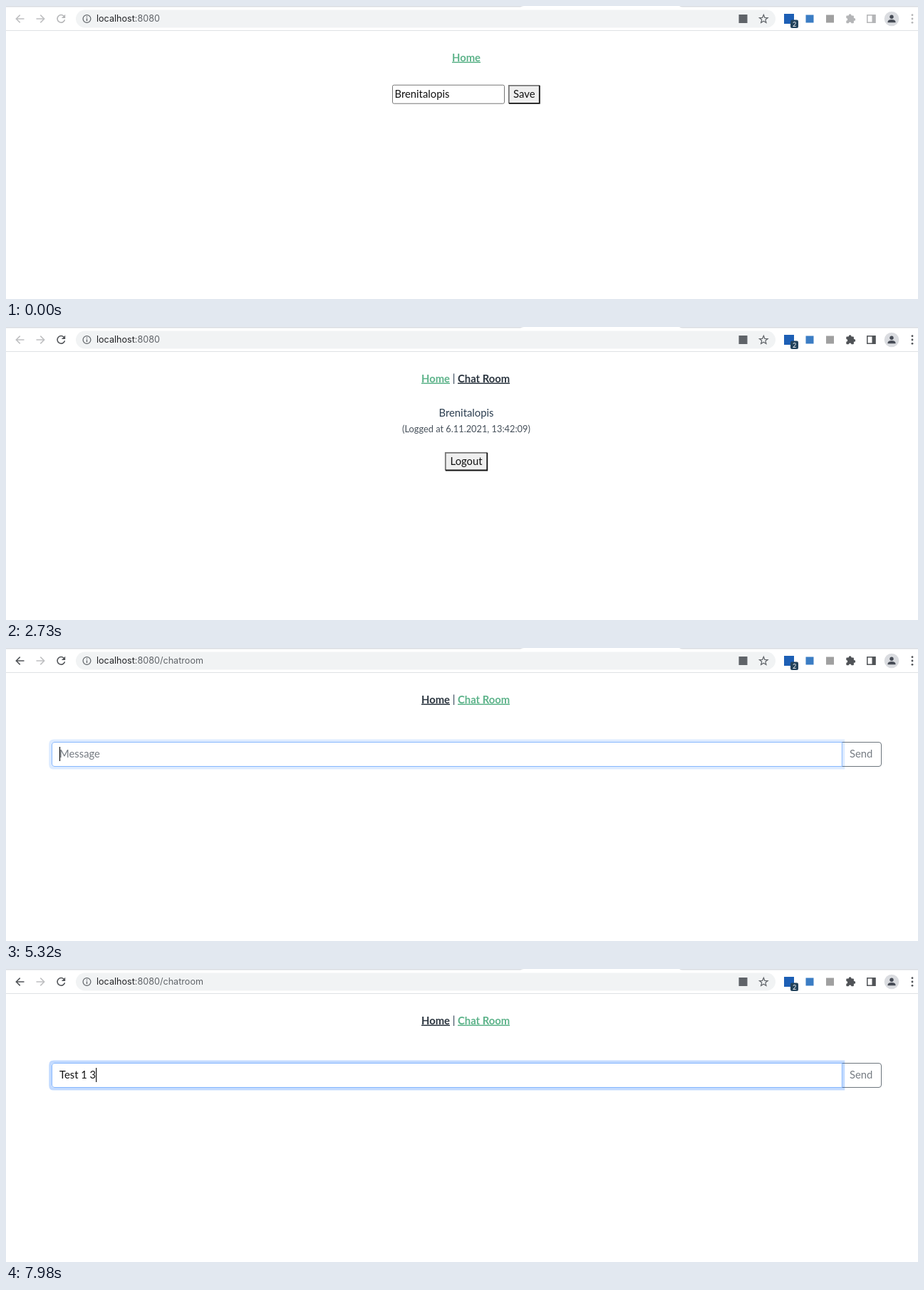
Animation of 1280x412 px, one loop 8 s. Source, as an HTML page:

```html
<!DOCTYPE html>
<html lang="en">
<head>
<meta charset="utf-8">
<title>Chat login</title>
<style>
  html, body { margin: 0; width: 100%; height: 100%; overflow: hidden; background: #fff; }
  svg { display: block; width: 1280px; height: 412px; }
  text { font: 14.8px Lato, "Open Sans", sans-serif; fill: #2c3e50; white-space: pre; }
  .url { font: 12.6px Inter, Roboto, sans-serif; fill: #5f6368; }
  .host { fill: #202124; }
  .link { font-weight: 700; text-decoration: underline; }
  .mid { text-anchor: middle; }
  .black { fill: #111; }
  .small { font-size: 12.8px; fill: #46505a; }
  .hint { fill: #757b82; }
  .line { fill: none; stroke: currentColor; stroke-width: 1.5; }
</style>
</head>
<body>
<svg viewBox="0 0 1280 412">
  <rect width="1280" height="412" fill="#fff"/>

  <!-- Browser toolbar -->
  <path d="M0 0H727Q724 0 722 1.5H0ZM945 0H1280V1.5H950Q947 1.5 945 0Z" fill="#dadde2"/>
  <path d="M0 34.5H1280" stroke="#dfe1e4"/>
  <rect x="98" y="5.5" width="982" height="25" rx="12.5" fill="#f1f3f4"/>
  <path id="back" class="line" d="M25.5 18H14.5M19.7 12.6 14.3 18 19.7 23.4"/>
  <path class="line" color="#bebfc1" d="M42.5 18H53.5M48.3 12.6 53.7 18 48.3 23.4"/>
  <g id="reload">
    <path class="line" d="M81.2 14.2A5.3 5.3 0 1 0 82.5 19.3"/>
    <path d="M83.2 11.7V17H77.9Z" fill="currentColor"/>
  </g>
  <g color="#5f6368">
    <circle class="line" cx="113.5" cy="18" r="5.4" style="stroke-width:1.2"/>
    <path class="line" d="M113.5 17.2V21M113.5 14.8V16.1" style="stroke-width:1.3"/>
    <rect x="1028.5" y="12" width="12" height="12" fill="currentColor"/>
    <path id="star" class="line" style="stroke-width:1.2"/>
  </g>
  <text class="url" x="127" y="22.4"><tspan class="host">localhost</tspan>:8080<tspan id="route"></tspan></text>
  <rect x="1092" y="11" width="14" height="14" fill="#1d5fb5"/>
  <rect x="1101" y="19.5" width="11" height="11.5" rx="2" fill="#23435c"/>
  <text class="mid" x="1106.5" y="28.7" style="font-size:9px;fill:#fff">2</text>
  <rect x="1122.5" y="12.5" width="11" height="11" fill="#3b7dc4"/>
  <rect x="1151" y="12.5" width="11" height="11" fill="#a0a0a0"/>
  <g id="tools">
    <g fill="currentColor">
      <rect x="1179.3" y="13.6" width="10.6" height="10.6" rx="1"/>
      <circle cx="1184.6" cy="13.2" r="1.9"/>
      <circle cx="1190.3" cy="18.9" r="1.9"/>
      <circle cx="1179.4" cy="18.9" r="1.8" fill="#fff"/>
      <circle cx="1184.6" cy="24.2" r="1.8" fill="#fff"/>
      <circle cx="1272" cy="12.7" r="1.4"/>
      <circle cx="1272" cy="18" r="1.4"/>
      <circle cx="1272" cy="23.3" r="1.4"/>
      <rect x="1215.5" y="12" width="5" height="12"/>
    </g>
    <rect class="line" x="1208.8" y="12.8" width="11" height="10.4"/>
  </g>
  <circle cx="1243" cy="18" r="10.3" fill="#dadce0"/>
  <g fill="#474c56">
    <circle cx="1243" cy="15.2" r="2.7"/>
    <path d="M1237.5 23.3V22Q1238 19 1243 19T1248.5 22V23.3Z"/>
  </g>

  <!-- Login -->
  <g id="login">
    <text class="link mid" x="646" y="77.5" style="fill:#5db38a">Home</text>
    <rect id="nameBox" fill="#fff"/>
    <text id="nameText" class="black" x="545.5" y="129"></text>
    <g id="save"></g>
  </g>

  <!-- Navigation once logged in -->
  <g id="nav">
    <text id="homeLink" class="link" x="583" y="77.5">Home</text>
    <text class="mid" x="628.5" y="77">|</text>
    <text id="chatLink" class="link" x="634" y="77.5">Chat Room</text>
  </g>

  <g id="profile">
    <text id="profileName" class="mid" x="646" y="126"></text>
    <text class="mid small" x="646" y="147.7">(Logged at 6.11.2021, 13:42:09)</text>
    <g id="logout"></g>
  </g>

  <g id="chat">
    <path d="M1172.5 132.5H1225Q1228.5 132.5 1228.5 136V163Q1228.5 166.5 1225 166.5H1172.5Z" fill="#fff" stroke="#6c757d"/>
    <text class="mid hint" x="1200.2" y="154">Send</text>
    <path id="ring" fill="none" stroke="#0d6efd" stroke-width="3.8"
      d="M1175.3 130.3H67Q62.2 130.3 62.2 135V164Q62.2 168.7 67 168.7H1175.3Z"/>
    <path id="messageBox" fill="#fff"/>
    <text id="messageText" x="75" y="154"></text>
  </g>
  <path id="caret" stroke="#111" stroke-width="1.2"/>
</svg>

<script>
const LOOP = 8000;
const USER = "Brenitalopis";
const MESSAGE = "Test 1 3";
const KEY_TIMES = [6510, 6720, 7000, 7210, 7420, 7560, 7770, 7980];
const GREEN = "#5db38a", INK = "#2c3640", DIM = "#b4b5b7", DARK = "#505357";

const $ = id => document.getElementById(id);
const show = (id, on) => $(id).setAttribute("display", on ? "inline" : "none");
const set = (id, attrs) => {
  for (const [key, value] of Object.entries(attrs)) $(id).setAttribute(key, value);
};
const within = (t, from, to) => t >= from && t < to;

function button(id, label, x, y, w, h) {
  const corner = (d, name) => `<path class="${name}" d="${d}" fill="none" stroke-width="1.8"/>`;
  $(id).innerHTML =
    `<rect x="${x}" y="${y}" width="${w}" height="${h}" fill="#efefef"/>` +
    corner(`M${x} ${y + h}V${y}H${x + w}`, "upper") +
    corner(`M${x} ${y + h}H${x + w}V${y}`, "lower") +
    `<text class="mid black" x="${x + w / 2}" y="${y + 17.2}">${label}</text>`;
  press(id, false);
}

function press(id, down) {
  const [upper, lower] = down ? ["#111", "#767676"] : ["#767676", "#111"];
  $(id).querySelector(".upper").style.stroke = upper;
  $(id).querySelector(".lower").style.stroke = lower;
}

function starPath(cx, cy, outer, inner) {
  const points = Array.from({ length: 10 }, (_, i) => {
    const r = i % 2 ? inner : outer, a = i * Math.PI / 5 - Math.PI / 2;
    return `${cx + r * Math.cos(a)} ${cy + r * Math.sin(a)}`;
  });
  return `M${points.join("L")}Z`;
}

function drawCaret(x, top, bottom) {
  set("caret", { d: `M${x} ${top}V${bottom}` });
}

function drawLogin(t) {
  const focused = within(t, 1820, 2520);
  const edge = focused ? 2 : 1;
  set("nameBox", {
    x: 542 + edge / 2, y: 110.7 + edge / 2, width: 158 - edge, height: 27 - edge,
    rx: 2, stroke: focused ? "#1c5c9c" : "#767676", "stroke-width": edge
  });
  press("save", t >= 2520);
  if (focused) drawCaret(545.5 + $("nameText").getComputedTextLength() + 0.3, 114, 134);
}

function drawChat(t) {
  const focused = t >= 5250;
  const glow = t < 5250 ? 0 : t < 5320 ? 0.1 : t < 5390 ? 0.55 : 1;
  const right = focused ? 1173.3 : 1172.5;
  set("messageBox", {
    d: `M${right} 132.5H68Q64.5 132.5 64.5 136V163Q64.5 166.5 68 166.5H${right}` + (focused ? "Z" : ""),
    stroke: glow > 0.5 ? "#86b7fe" : glow ? "#c6d1df" : "#ced4da"
  });
  set("ring", { opacity: 0.25 * glow });

  const typed = MESSAGE.slice(0, KEY_TIMES.filter(k => t >= k).length);
  const text = $("messageText");
  text.textContent = typed || "Message";
  text.setAttribute("class", typed ? "black" : "hint");
  if (focused) drawCaret(75.5 + (typed ? text.getComputedTextLength() : 0), 139, 159);
}

function render(t) {
  const login = t < 2730, chat = t >= 4410;
  show("login", login);
  show("nav", !login);
  show("profile", !login && !chat);
  show("chat", chat);
  show("caret", within(t, 1820, 2380) || within(t, 5250, 5740) || t >= 6300);

  const active = t >= 1890 ? DARK : DIM;
  set("reload", { color: active });
  set("tools", { color: active });
  set("back", { color: chat ? DARK : "#bebfc1" });
  $("route").textContent = chat ? "/chatroom" : "";
  $("homeLink").style.fill = chat ? INK : GREEN;
  $("chatLink").style.fill = chat ? GREEN : INK;

  if (login) drawLogin(t);
  if (chat) drawChat(t);
}

button("save", "Save", 705.8, 111.8, 43, 25);
button("logout", "Logout", 616.8, 176.8, 58.5, 24.7);
set("star", { d: starPath(1063.3, 18.5, 6.2, 2.7) });
$("nameText").textContent = $("profileName").textContent = USER;

const start = performance.now();
function tick() {
  render((performance.now() - start) % LOOP);
  requestAnimationFrame(tick);
}
tick();
</script>
</body>
</html>
```
